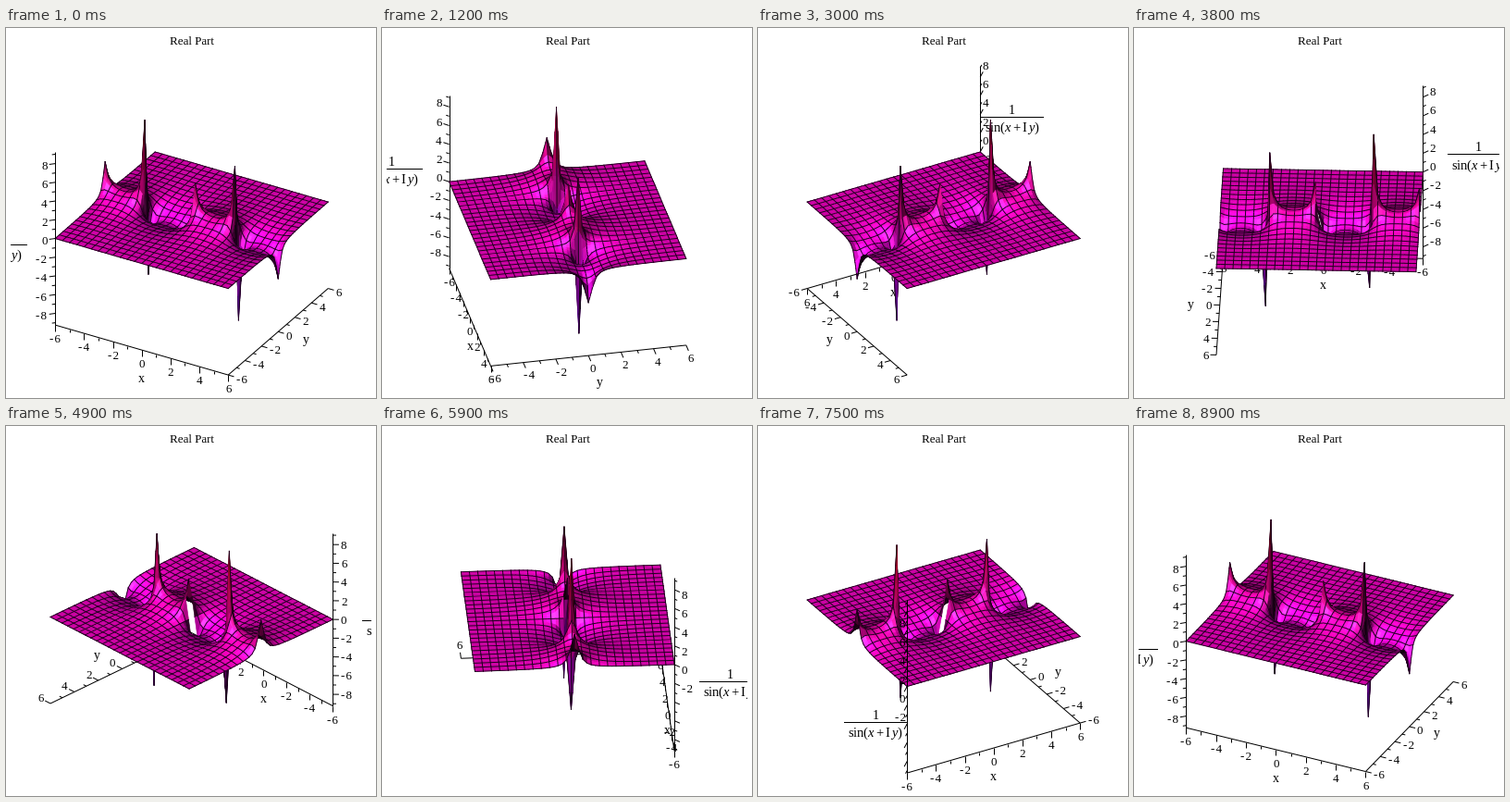
Recreate the animation shown at these times as a matplotlib script. Size 400 by 400 pixels, loop 9 s.

```python
import numpy as np
import matplotlib.pyplot as plt
from matplotlib.animation import FuncAnimation
from matplotlib.collections import LineCollection, PathCollection
from matplotlib.colors import hsv_to_rgb
from matplotlib.path import Path

PX = 0.72                      # points per pixel at 100 dpi
FRAMES = 90
SIDE = 216                     # edge of the plot cube in pixels
SIN, COS = 0.5, np.sqrt(0.75)  # camera elevation of 30 degrees
CX, CY = 200.7, 207.8
ZMAX = -1 / np.sin(3.25)

plt.rcParams.update({
    "font.family": ["Liberation Serif", "DejaVu Serif"],
    "mathtext.fontset": "custom",
    "mathtext.rm": "Liberation Serif",
    "mathtext.it": "Liberation Serif:italic",
})

fig = plt.figure(figsize=(4, 4), dpi=100, facecolor="white")
ax = fig.add_axes([5 / 400, 5 / 400, 390 / 400, 390 / 400])
ax.set(xlim=(5, 395), ylim=(395, 5))
ax.axis("off")


def project(p, ca, sa):
    u, v, w = p[..., 0], p[..., 1], p[..., 2]
    x = CX + SIDE * (u * ca + v * sa)
    y = CY + SIDE * (SIN * (u * sa - v * ca) - COS * w)
    return np.stack([x, y], axis=-1)


def unit(x, y):
    return np.array([x, y]) / np.hypot(x, y)


# ---- surface: Re(1 / sin(x + iy)) sampled every 0.25 ----
def real_part(x, y):
    with np.errstate(all="ignore"):
        z = (1 / np.sin(x + 1j * y)).real
    return np.where((x == 0) & (y == 0), 0, z)


def merge(*parts):
    return np.unique(np.round(np.concatenate(parts), 6))


coarse = np.linspace(-6, 6, 49)
steep = np.linspace(2.75, 3.5, 10)
xs = merge(coarse, steep, -steep)
ys = merge(np.linspace(-6, 6, 25), np.linspace(-3, 3, 25), np.linspace(-0.25, 0.25, 7))

rows = real_part(coarse[:, None], coarse[None, :])
half = np.array([np.interp(ys, coarse, r) for r in rows])
zs = np.array([np.interp(xs, coarse, c) for c in half.T]).T
gx, gy = np.meshgrid(xs, ys, indexing="ij")
grid = np.stack([gx / 12, gy / 12, zs / (2 * ZMAX)], axis=-1)

a, b, c, d = grid[:-1, :-1], grid[1:, :-1], grid[1:, 1:], grid[:-1, 1:]
cells = np.stack([a, b, c, d, a], axis=2)
mids = cells[:, :, :4].mean(axis=2)


def off_pole(m):
    """The function is undefined at the origin, so nothing touches it."""
    return (abs(m[..., 0]) > 0.25 / 12) | (abs(m[..., 1]) > 0.25 / 12)


ix = np.flatnonzero(xs * 2 % 1 == 0)
iy = np.flatnonzero(ys * 2 % 1 == 0)


def segments(p, q):
    return np.stack([p, q, q, q, q], axis=2)


along_y = segments(grid[ix, :-1], grid[ix, 1:])
along_x = segments(grid[:-1, iy], grid[1:, iy])

keep_c = off_pole(mids)
keep_y = off_pole(along_y[:, :, :2].mean(axis=2))
keep_x = off_pole(along_x[:, :, :2].mean(axis=2))
items = np.concatenate([cells[keep_c], along_y[keep_y], along_x[keep_x]])
n_cells, n_items = keep_c.sum(), len(items)

normals = np.cross(c - a, d - b)[keep_c]
normals /= np.linalg.norm(normals, axis=1, keepdims=True)
height = mids[keep_c][:, 2] * 2
hue = (312 + 45 * height) / 360
base = hsv_to_rgb(np.stack([hue, np.ones_like(hue), np.ones_like(hue)], axis=1))

LIGHT = np.array([-0.2, 0.35, 0.9])
LIGHT /= np.linalg.norm(LIGHT)
HALF = LIGHT + [0, 0, 1]
HALF /= np.linalg.norm(HALF)


def shade(ca, sa):
    view = np.array([[ca, sa, 0],
                     [-SIN * sa, SIN * ca, COS],
                     [COS * sa, -COS * ca, SIN]])
    n = normals @ view.T
    n[n[:, 2] < 0] *= -1
    diffuse = np.clip(n @ LIGHT, 0, 1)[:, None] ** 1.5
    shine = np.clip(n @ HALF, 0, 1)[:, None] ** 12
    return np.clip(base * (0.05 + 1.12 * diffuse) + 0.28 * shine, 0, 1)


def depth_keys(ca, sa):
    """Ground depth; a mesh line is drawn just after its nearer cell."""
    k = mids[..., 0] * sa - mids[..., 1] * ca
    p = np.pad(k, 1, constant_values=-9)
    ky = np.maximum(p[ix, 1:-1], p[ix + 1, 1:-1]) + 1e-6
    kx = np.maximum(p[1:-1, iy], p[1:-1, iy + 1]) + 1e-6
    return np.concatenate([k[keep_c], ky[keep_y], kx[keep_x]])


buf = np.zeros((n_items, 5, 2))
surface = PathCollection([Path(v) for v in buf], transform=ax.transData,
                         joinstyle="bevel", capstyle="projecting", zorder=2)
ax.add_collection(surface, autolim=False)
face = np.zeros((n_items, 4))
edge = np.tile([0.1, 0, 0.1, 1.0], (n_items, 1))
face[:n_cells, 3] = 1
width = np.where(np.arange(n_items) < n_cells, 0.6, 0.95) * PX


def draw_surface(ca, sa):
    order = np.argsort(depth_keys(ca, sa), kind="stable")
    buf[:] = project(items, ca, sa)[order]
    face[:n_cells, :3] = edge[:n_cells, :3] = shade(ca, sa)
    surface.set_facecolor(face[order])
    surface.set_edgecolor(edge[order])
    surface.set_linewidth(width[order])


# ---- axes ----
def label(s, size=13):
    return ax.text(0, 0, s, fontsize=size * PX, ha="center",
                   va="center_baseline", clip_on=True)


class Axis:
    def __init__(self, place, limit, name=None):
        n = int(limit)
        self.values = np.arange(-n, n + 1)
        self.ticks = np.array([place(v) for v in self.values])
        self.ends = np.array([place(-limit), place(limit), place(0)])
        self.lines = LineCollection([], colors="black", linewidths=PX)
        ax.add_collection(self.lines, autolim=False)
        self.labels = {i: label(str(v).replace("-", "-\u200a"))
                       for i, v in enumerate(self.values) if v % 2 == 0}
        self.name = label(name, 14) if name else None

    def update(self, ca, sa, way, front, lowest=-9):
        z = 3 if front else 1
        pts = project(self.ticks, ca, sa)
        lo, hi, mid = project(self.ends, ca, sa)
        segs = [(lo, hi)]
        for i, (v, p) in enumerate(zip(self.values, pts)):
            segs.append((p, p + way * (3.5 if v % 2 else 6.5)))
            if i in self.labels:
                wide = 6.5 if v < 0 else 3.3
                self.labels[i].set_position(p + way * (8.5 + np.array([wide, 6])))
                self.labels[i].set_zorder(z)
                self.labels[i].set_visible(v >= lowest)
        self.lines.set_segments(segs)
        self.lines.set_zorder(z)
        if self.name:
            self.name.set_position(mid + way * 31 - (0, 1))
            self.name.set_zorder(z)
        return mid, z


x_axis = Axis(lambda v: (v / 12, -0.5, -0.5), 6, "x")
y_axis = Axis(lambda v: (0.5, v / 12, -0.5), 6, "y")
z_axis = Axis(lambda v: (-0.5, -0.5, v / (2 * ZMAX)), ZMAX)

top = label("1", 14)
bottom = label(r"$\mathrm{sin}(x+\mathrm{I}\,y)$", 14.5)
bar, = ax.plot([], [], color="black", lw=PX)


def draw_fraction(mid, way, z):
    reach = np.sign(way) * abs(way) ** 0.75
    x, y = mid + way * 32 + reach * (33.5, 11)
    top.set_position((x, y - 8))
    bottom.set_position((x, y + 10))
    bar.set_data([x - 33.5, x + 33.5], [y, y])
    for part in (top, bottom, bar):
        part.set_zorder(z)


ax.text(201, 13, "Real Part", fontsize=13 * PX, ha="center", va="center_baseline")


def update(i):
    t = np.radians(30 + 360 * i / FRAMES)
    ca, sa = np.cos(t), np.sin(t)
    draw_surface(ca, sa)
    x_axis.update(ca, sa, np.array([0.0, 1.0]), ca > 0)
    y_axis.update(ca, sa, unit(ca, SIN * sa), sa > 0)
    out = unit(-(ca + sa), SIN * (ca - sa))
    # the lower labels drop out while the z axis stands towards the viewer
    mid, z = z_axis.update(ca, sa, out, ca > sa, -2 if out[1] > 0.25 else -9)
    draw_fraction(mid, out, z)
    return []


anim = FuncAnimation(fig, update, frames=FRAMES, interval=100,
                     repeat=True, repeat_delay=0, blit=False)
plt.show()
```
